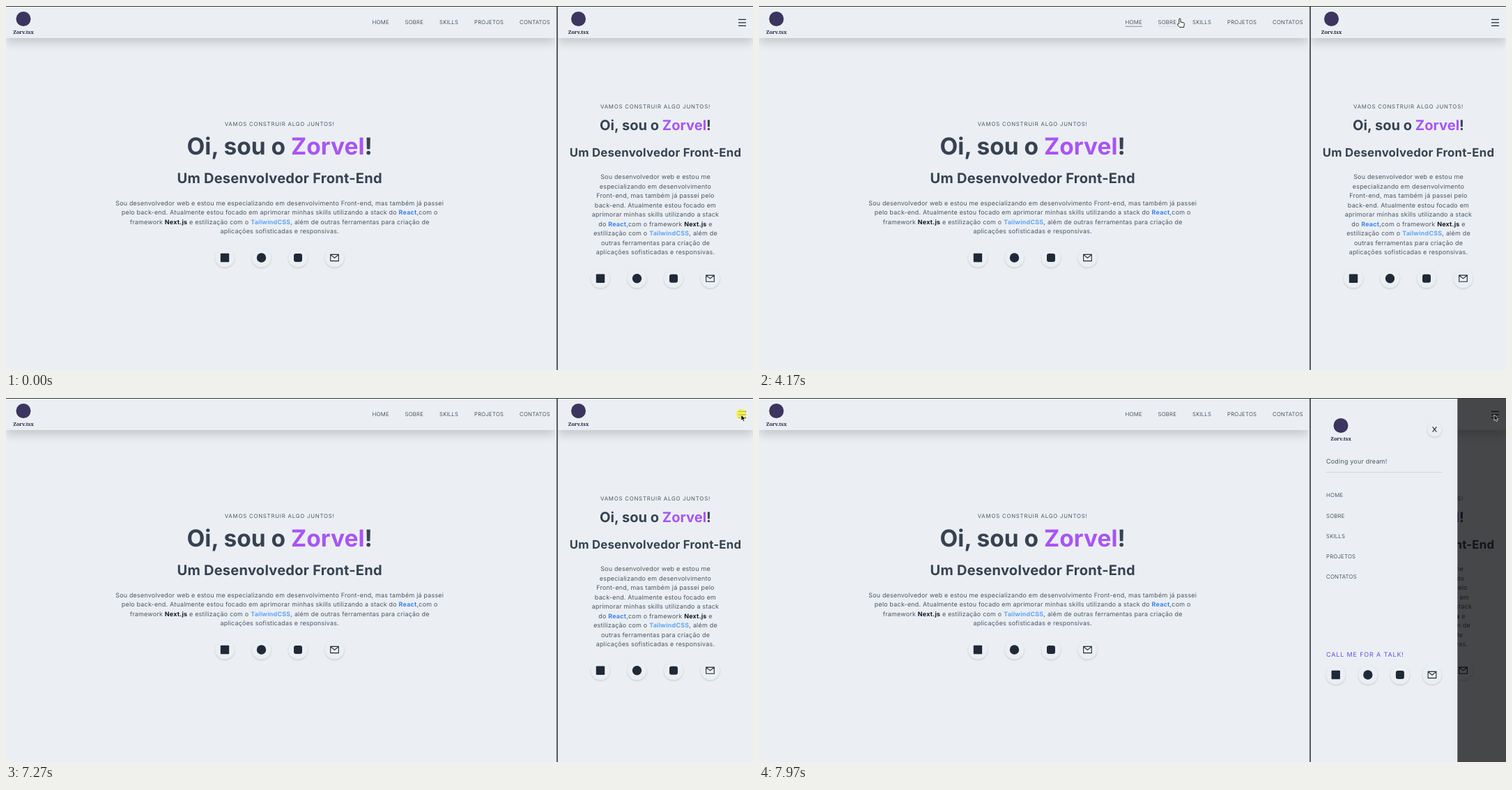
An HTML page that plays this animation: 1072x522 px, repeating every 8000 ms.

```html
<!DOCTYPE html>
<html lang="pt-BR">
<head>
<meta charset="utf-8">
<title>Portfólio</title>
<style>
  html, body { margin: 0; width: 100%; height: 100%; overflow: hidden; background: #ebeff3; }
  svg { display: block; }
  text {
    font: 8.93px Inter, sans-serif; letter-spacing: .223px; fill: #4b5563;
    font-optical-sizing: none; text-rendering: geometricPrecision;
  }
  .mid { text-anchor: middle; }
  .nav { font-size: 7.82px; font-weight: 300; fill: #1f2937; }
  .wide { font-size: 7.82px; letter-spacing: .1em; }
  .call { letter-spacing: .1em; fill: #5651e5; }
  .h { font-weight: 700; fill: #374151; }
  .tight { letter-spacing: 0; }
  .brand { font: 900 7.1px "Noto Serif", serif; letter-spacing: 0; fill: #1e1b3a; }
  .bold { font-weight: 700; }
  .bar { fill: #ebeff3; filter: drop-shadow(0 6px 7px rgba(0, 0, 0, .17)); }
  .disc { fill: #ebeff3; filter: drop-shadow(0 1px 1px rgba(0, 0, 0, .17)); }
  .line { fill: none; stroke: #1f2937; stroke-width: 1.1; }
</style>
</head>
<body>
<svg id="stage" width="1072" height="522" viewBox="0 0 1072 522"></svg>
<script>
const BG = '#ebeff3', INK = '#1f2937', LOOP = 8000;
const stage = document.getElementById('stage');
const $ = id => document.getElementById(id);
const clamp = v => Math.max(0, Math.min(1, v));

const accents = { React: '#3b82f6', 'Next.js': '#111827', TailwindCSS: '#60a5fa' };
const accent = s => s.replace(/React|Next\.js|TailwindCSS/g,
  w => `<tspan class="bold" fill="${accents[w]}">${w}</tspan>`);

const text = (x, y, s, cls = '', size) =>
  `<text x="${x}" y="${y}" class="${cls}"${size ? ` style="font-size:${size}px"` : ''}>${s}</text>`;
const lines = (x, y, rows) => rows.map((s, i) => text(x, y + i * 13.5, accent(s), 'mid')).join('');
const rect = (x, y, w, h, fill, more = '') =>
  `<rect x="${x}" y="${y}" width="${w}" height="${h}" fill="${fill}" ${more}/>`;
const pane = (x, w, body) =>
  `<svg x="${x}" y="1" width="${w}" height="521" viewBox="${x} 1 ${w} 521">${rect(x, 1, w, 521, BG)}${body}</svg>`;
const brand = (x, y) =>
  `<circle cx="${x}" cy="${y}" r="10.5" fill="#3b3560"/>` + text(x, y + 21, 'Zorv.tsx', 'brand mid');

const glyphs = [
  rect(-6.2, -6.2, 12.4, 12.4, INK, 'rx="1"'),
  `<circle r="6.7" fill="${INK}"/>`,
  rect(-6, -6, 12, 12, INK, 'rx="3"'),
  '<path class="line" d="M-5.8-4.6H5.8V4.6H-5.8ZM-5.8-4.4L0 .2L5.8-4.4"/>'
];
const icons = (x, y, gap, id) => glyphs.map((g, i) =>
  `<g transform="translate(${x + i * gap} ${y})"><g id="${id}${i}"><circle class="disc" r="13.8"/>${g}</g></g>`).join('');

const hero = (x, name, a, b, c, big, mid) =>
  text(x, a, 'VAMOS CONSTRUIR ALGO JUNTOS!', 'wide mid') +
  text(x, b, `Oi, sou o <tspan fill="#a855f7">${name}</tspan>!`, 'h tight mid', big) +
  text(x, c, 'Um Desenvolvedor Front-End', 'h mid', mid);

// label, left, right, time entered, time left
const links = [
  ['HOME', 525.5, 550, 3700, 3980],
  ['SOBRE', 572.5, 600, 4080, 4270],
  ['SKILLS', 622, 650, 4340, 4520],
  ['PROJETOS', 672, 715, 4620, 4900],
  ['CONTATOS', 737, 782, 5050, 5400]
];

const desktop = pane(0, 788,
  rect(0, 0, 788, 46, BG, 'class="bar"') + brand(25, 18.5) +
  links.map(([s, x, end], i) => text(x, 26.4, s, 'nav') +
    rect(x, 28.8, end - x, 1, '#8b9099', `id="under${i}"`)).join('') +
  hero(392.7, 'Zorvel', 171.5, 212.7, 253.5, 33.5, 20.1) +
  lines(392.7, 285.5, [
    'Sou desenvolvedor web e estou me especializando em desenvolvimento Front-end, mas também já passei',
    'pelo back-end. Atualmente estou focado em aprimorar minhas skills utilizando a stack do React,com o',
    'framework Next.js e estilização com o TailwindCSS, além de outras ferramentas para criação de',
    'aplicações sofisticadas e responsivas.'
  ]) + icons(314, 361, 52.5, 'icon'));

const drawer = rect(792, 1, 210.3, 521, BG) + brand(835, 39.5) +
  '<circle class="disc" cx="969.5" cy="45" r="10.5"/>' +
  '<path class="line" d="M966.6 41.4L972.4 48.6M972.4 41.4L966.6 48.6"/>' +
  text(814, 94, 'Coding your dream!') + rect(814, 106, 166, 1, '#d1d5db') +
  links.map(([s], i) => text(814, 142.3 + i * 29.2, s, 'nav')).join('') +
  text(814, 370.8, 'CALL ME FOR A TALK!', 'call') + icons(827.7, 397, 46.1, 'talk');

const mobile = pane(792, 280,
  rect(792, 0, 280, 46, BG, 'class="bar"') + brand(821.5, 18.5) +
  `<path d="M1051 19.3H1062M1051 23.8H1062M1051 28.3H1062" stroke="${INK}" stroke-width="1.3"/>` +
  hero(932, 'Zorvel', 147.4, 177.8, 216, 20.1, 16.75) +
  lines(932, 248, [
    'Sou desenvolvedor web e estou me',
    'especializando em desenvolvimento',
    'Front-end, mas também já passei pelo',
    'back-end. Atualmente estou focado em',
    'aprimorar minhas skills utilizando a stack',
    'do React,com o framework Next.js e',
    'estilização com o TailwindCSS, além de',
    'outras ferramentas para criação de',
    'aplicações sofisticadas e responsivas.'
  ]) + icons(853, 390.7, 52.5, 'small') +
  `<g id="menu">${rect(792, 1, 280, 521, '#000', 'opacity=".7"')}<g id="drawer">${drawer}</g></g>`);

stage.innerHTML = desktop + mobile +
  rect(788, 1, 4, 521, '#e6eaee') + rect(790.2, 0, 1.6, 522, '#34363c') + rect(0, 0, 1072, 1, '#34363c') +
  '<circle id="click" cx="1055" cy="23" r="7.3" fill="#f6f032" opacity=".75"/>' +
  `<g id="cursor">
    <path id="arrow" fill="#000" stroke="#fff" stroke-width=".7" d="M0 0V8.4L2 6.7L3.3 9.6L4.8 8.9L3.5 6.1L6.1 5.9Z"/>
    <path id="hand" fill="#fff" stroke="#111" stroke-width=".9" d="M-1.2 7.5V1a1.1 1.1 0 0 1 2.2 0V5l4 .8q1.6.4 1.4 2L5.6 12.5H-.4L-3.6 8.6q0-1.4 1.4-.8z"/>
  </g>`;

// pointer path: time, x, y
const path = [
  [320, 899, 514], [1060, 487, 368], [1580, 409.5, 360], [1870, 362, 362], [2300, 338, 360],
  [2720, 311, 361], [2790, 311, 361], [3540, 531, 36], [3610, 534, 34], [3800, 540, 20],
  [4170, 604, 18], [4380, 633, 19], [5230, 762, 20], [5300, 775, 21], [5920, 1007.5, 39],
  [6060, 1012, 39], [6130, 1019, 37], [6470, 1053, 24], [6670, 1055, 24], [LOOP, 1055, 24]
];
function pointer(t) {
  const i = Math.max(1, path.findIndex(p => p[0] > t));
  const [a, b] = [path[i - 1], path[i]];
  const k = clamp((t - a[0]) / (b[0] - a[0]));
  return [a[1] + (b[1] - a[1]) * k, a[2] + (b[2] - a[2]) * k];
}

// cubic-bezier(.4, 0, 1, 1)
function easeIn(x) {
  let lo = 0, hi = 1;
  for (let n = 0; n < 24; n++) {
    const s = (lo + hi) / 2, r = 1 - s;
    if (1.2 * r * r * s + 3 * r * s * s + s ** 3 < x) lo = s; else hi = s;
  }
  return 3 * lo * lo - 2 * lo ** 3;
}

const tick = (t, from) => from + Math.floor((t - from) / 70) * 70;
const show = (id, on) => $(id).setAttribute('visibility', on ? 'visible' : 'hidden');

function draw() {
  const now = performance.now() % LOOP, t = tick(now, 320);
  const [x, y] = pointer(t);
  let hand = false;

  links.forEach(([, left, right, enter, leave], i) => {
    $('under' + i).setAttribute('opacity', clamp((t - enter) / 400) * clamp((leave + 620 - t) / 120));
    hand ||= y < 30 && x > left - 3 && x < right + 6;
  });
  glyphs.forEach((_, i) => {
    const d = Math.hypot(x - 314 - i * 52.5, y - 361);
    $('icon' + i).setAttribute('transform', `scale(${1 + .05 * clamp((18 - d) / 6)})`);
    hand ||= d < 14.5;
  });

  $('cursor').setAttribute('transform', `translate(${x} ${y})`);
  const visible = now >= 320;
  show('arrow', visible && !hand);
  show('hand', visible && hand);
  show('click', now >= 7270 && now < 7490);

  show('menu', now >= 7490);
  const k = easeIn(clamp(((now < 7690 ? 7490 : tick(now, 7690)) - 7458) / 500));
  $('drawer').setAttribute('transform', `translate(${-280 * (1 - k)} 0)`);
  $('drawer').setAttribute('opacity', k);
  requestAnimationFrame(draw);
}
draw();
</script>
</body>
</html>
```
